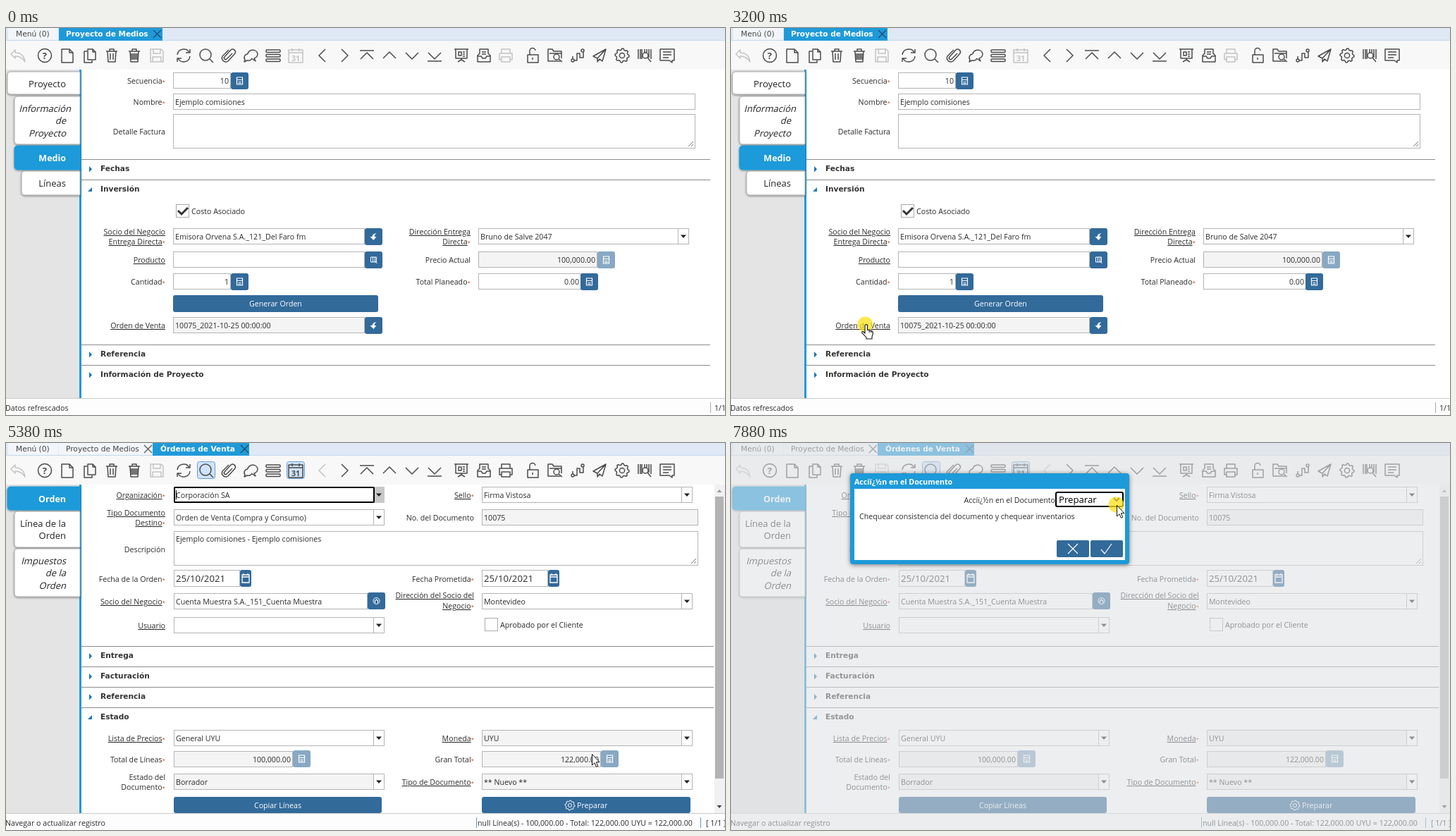
Animation of 1020x549 px, one loop 8000 ms. Source, as an HTML page:

```html
<!DOCTYPE html>
<html lang="es">
<head>
<meta charset="utf-8">
<title>Órdenes de Venta</title>
<style>
html, body { margin: 0; width: 100%; height: 100%; overflow: hidden; background: #fff; }
svg { display: block; width: 100vw; height: 100vh; }
text { font: 10.65px "Open Sans", "Noto Sans", sans-serif; fill: #2b2b2b; white-space: pre; }
.end { text-anchor: end; }
.mid { text-anchor: middle; }
.white { fill: #fff; }
.link { text-decoration: underline; }
.star { font-size: 8px; fill: #c8501e; }
.head { font: bold 10.6px "DejaVu Sans", Verdana, sans-serif; fill: #333; }
.tab { font: 10.65px "DejaVu Sans", Verdana, sans-serif; fill: #444; }
.tab.active { font-weight: bold; font-size: 10.5px; fill: #fff; }
.side { font-size: 13px; fill: #222; text-anchor: end; }
.side.active { font-weight: bold; font-size: 12.5px; fill: #fff; }
.date { font-size: 13.2px; }
.select { font-size: 13.2px; fill: #000; }
.title { font-weight: bold; fill: #fff; }
.ico { fill: none; stroke: #4b4b4b; stroke-width: 1.5; stroke-linejoin: round; }
.ico text { fill: #4b4b4b; stroke: none; font-weight: bold; }
.ico.off { opacity: .3; }

.anim { animation: 8s step-end infinite; }
#medios { animation-name: medios; }
#orden { animation-name: orden; }
#focus { animation-name: focus; }
#caret { animation-name: caret; }
#hover { animation-name: hover; }
#dialog { animation-name: dialog; }
#pick { animation-name: pick; }
#ring { animation-name: ring; }
#hand { animation-name: hand; }
#arrow { animation-name: arrow; }
#cursor { animation: move 8s infinite; }
@keyframes medios { 0% { opacity: 1 } 51.125%, 100% { opacity: 0 } }
@keyframes orden { 0% { opacity: 0 } 51.125%, 100% { opacity: 1 } }
@keyframes focus { 0% { opacity: 0 } 52% { opacity: 1 } 78.25%, 100% { opacity: 0 } }
@keyframes caret { 0%, 65.625% { opacity: 1 } 58.875%, 72.25%, 100% { opacity: 0 } }
@keyframes hover { 0% { opacity: 0 } 70.5% { opacity: 1 } 84.875%, 100% { opacity: 0 } }
@keyframes dialog { 0% { opacity: 0 } 83.25%, 100% { opacity: 1 } }
@keyframes pick { 0% { opacity: 0 } 84.875%, 100% { opacity: 1 } }
@keyframes ring {
  0%, 42.125%, 79.875% { opacity: 0 }
  39.125%, 77.375%, 98.5%, 100% { opacity: .75 }
}
@keyframes hand { 0% { opacity: 0 } 30.5% { opacity: 1 } 58.875%, 100% { opacity: 0 } }
@keyframes arrow { 0% { opacity: 1 } 30.5% { opacity: 0 } 58.875%, 100% { opacity: 1 } }
@keyframes move {
  0% { transform: translate(1030px, 560px); animation-timing-function: step-end }
  7.5% { transform: translate(985px, 530px); animation-timing-function: steps(3) }
  10.125% { transform: translate(430px, 254px); animation-timing-function: step-end }
  11% { transform: translate(359px, 267px); animation-timing-function: step-end }
  18.375% { transform: translate(359px, 267px); animation-timing-function: steps(7) }
  24.5% { transform: translate(139px, 425px); animation-timing-function: steps(2) }
  26.125% { transform: translate(167px, 431px); animation-timing-function: steps(3) }
  28.75% { transform: translate(208px, 433px); animation-timing-function: steps(4) }
  32.25% { transform: translate(191px, 421px); animation-timing-function: step-end }
  58% { transform: translate(191px, 421px); animation-timing-function: steps(5) }
  62.25% { transform: translate(820px, 468px); animation-timing-function: step-end }
  64.75% { transform: translate(820px, 468px); animation-timing-function: steps(3) }
  67.25% { transform: translate(831px, 441px); animation-timing-function: steps(4) }
  70.5% { transform: translate(829px, 510px); animation-timing-function: steps(3) }
  73% { transform: translate(827px, 506px); animation-timing-function: step-end }
  86.5% { transform: translate(827px, 506px); animation-timing-function: steps(5) }
  90.875% { transform: translate(650px, 260px); animation-timing-function: steps(5) }
  95.25%, 100% { transform: translate(547px, 88px) }
}
</style>
</head>
<body>
<svg id="stage" viewBox="0 0 1020 549" preserveAspectRatio="none"></svg>
<script>
const BLUE = '#1f9ad9', BTN = '#326a9a', LINE = '#b4b4b4', OFF = '#f4f4f4';

const text = (x, y, s, cls = '') => `<text x="${x}" y="${y}" class="${cls}">${s}</text>`;
const fill = (x, y, w, h, color, r = 0) =>
  `<rect x="${x}" y="${y}" width="${w}" height="${h}" rx="${r}" fill="${color}"/>`;
const box = (x, y, w, h, color = '#fff', stroke = LINE, r = 0) =>
  `<rect x="${x + .5}" y="${y + .5}" width="${w - 1}" height="${h - 1}" rx="${r}" fill="${color}" stroke="${stroke}"/>`;
const path = (d, stroke, w = 1, color = 'none') =>
  `<path d="${d}" stroke="${stroke}" stroke-width="${w}" fill="${color}"/>`;
const at = (x, y, s, attr = '') => `<g transform="translate(${x} ${y})" ${attr}>${s}</g>`;

// "_" marks a linked label, a closing "*" a required one
const label = (x, y, s) => {
  const star = s.endsWith('*'), link = s[0] === '_';
  const word = s.replace(/^_|\*$/g, '');
  return text(x, y, `<tspan class="${link ? 'link' : ''}">${word}</tspan>` +
    (star ? '<tspan class="star">*</tspan>' : ''), 'end');
};
const field = (x, y, w, s = '', color) => box(x, y, w, 23, color) + text(x + 3, y + 16, s);
const number = (x, y, w, s, color) => box(x, y, w, 23, color) + text(x + w - 3, y + 16, s, 'end');
const down = (x, y) => `<path d="M${x - 4} ${y - 2}h8l-4 4.500z" fill="#222"/>`;
const combo = (x, y, s = '', color = '#fff') => field(x, y, 299, s, color) +
  box(x + 283, y, 16, 23) + down(x + 291, y + 11.5);
const area = (x, y, w, s = '') => box(x, y, w, 49) + text(x + 3, y + 15, s) +
  path(`M${x + w - 10} ${y + 46}l7-7m-3 7l3-3`, '#777');

const glyphs = {
  calc: path('M-4-5H4V5H-4ZM-4-1.500H4M-2 1.500H2M-2 3.500H2', '#fff', 1.2),
  zoom: '<path d="M4-5Q-2-4-2 0H-5L0 5L4 0H1Q1-3 4-5Z" fill="#fff"/>',
  item: path('M-4-4H4V3H-4ZM-1-4V3M2-4V3M1 1L5 5', '#fff', 1),
  user: '<circle r="4.500" fill="none" stroke="#fff"/>' + path('M-2 3V-1H2V3M0-3V-1', '#fff'),
  date: path('M-5-5H5V6H-5ZM-5-2H5M-3-7V-4M3-7V-4', '#fff', 1.3)
};
const mini = (x, y, kind, off, w = 25) => at(x, y,
  fill(0, 0, w, 24, BTN, 3) + at(w / 2, 12, glyphs[kind]), off ? 'opacity=".58"' : '');
const date = (x, y, s) => box(x, y, 94, 24) + text(x + 3, y + 17, s, 'date') +
  mini(x + 94, y, 'date', false, 16);
const button = (x, y, w, h, s, color = BTN) => fill(x, y, w, h, color, 3) +
  text(x + w / 2, y + 16, s, 'mid white');
const check = (x, y, on) => box(x, y, 19, 19, '#fff', '#aaa') +
  (on ? path(`M${x + 3} ${y + 9}l5 5l9-9`, '#333', 3) : '');

const rule = (y, end) => fill(107, y, end - 107, 1, '#8c8c8c');
const section = (y, s, end, open) => rule(y, end) + text(134, y + 16.5, s, 'head') +
  `<path d="${open ? `M122 ${y + 11}v6h-6z` : `M118 ${y + 10}l4 4.200l-4 4.200z`}" fill="#1878b4"/>`;

const gear = r => {
  let d = '';
  for (let i = 0; i < 32; i++) {
    const a = i * Math.PI / 16, k = i % 4 < 2 ? r : r * .8;
    d += `${i ? 'L' : 'M'}${(k * Math.cos(a)).toFixed(1)} ${(k * Math.sin(a)).toFixed(1)}`;
  }
  return `<path d="${d}Z"/><circle r="${r * .36}"/>`;
};
const p = d => `<path d="${d}"/>`;
const bin = p('M-8-6H8M-3-6V-9H3V-6M-6-6L-5 9H5L6-6M-2-3V6M2-3V6');
const icons = {
  undo: [17, p('M-10-2L-4-8V-4Q8-4 10 9Q5 1-4 1V4Z')],
  help: [55, '<circle r="9.500"/>' + text(0, 5, '?', 'mid select')],
  add: [87, p('M-8-9H3L8-4V10H-8ZM3-9V-4H8')],
  copy: [119, p('M-3-9H4L8-5V6H-3ZM4-9V-5H8M-4-6H-8V10H3V7')],
  del: [150, bin],
  delAll: [182, bin + p('M0-3V6M-4-3V6M4-3V6')],
  save: [214, p('M-9-9H6L9-6V9H-9ZM-5-9V-3H5V-9M-6 9V2H6V9')],
  sync: [252, p('M-9-1A9 9 0 0 1 8-4M9-9V-4H3M9 1A9 9 0 0 1-8 4M-9 9V4H-3')],
  find: [284, '<circle cx="-1" cy="-1" r="8"/>' + p('M5 5L10 10')],
  clip: [316, p('M5-3L-3 5A2 2 0 0 1-6 2L3-8A4 4 0 0 1 9-3L-1 8A5.500 5.500 0 0 1-9 1L0-8')],
  chat: [347, p('M-4-2A7 6 0 1 1 5 4L7 8L1 4M-4-2A5 5 0 0 0-8 6L-9 9L-5 7A6 5 0 0 0 2 4')],
  rows: [379, [-8, -1.5, 5].map(y => `<rect x="-10" y="${y}" width="20" height="3.500" rx="1"/>`).join('')],
  cal: [411, p('M-10-8H10V10H-10ZM-10-4H10M-5-10V-6M5-10V-6') + text(0, 7.5, '31', 'mid')],
  prev: [449, p('M4-9L-5 0L4 9')],
  next: [480, p('M-4-9L5 0L-4 9')],
  top: [512, p('M-10-7H10M-9 5L0-4L9 5')],
  up: [544, p('M-9 4L0-5L9 4')],
  down: [576, p('M-9-4L0 5L9-4')],
  bottom: [608, p('M-10 8H10M-9-4L0 5L9-4')],
  board: [646, p('M-10-9H10M-8-9V4H8V-9M0 4V7M-5 9L0 6L5 9M-4-5H0V0H-4ZM2-5H5M2-2H5M2 1H5')],
  tray: [678, p('M-9 0L-6-3V-9H6V-3L9 0V9H-9ZM-9 1H-4L-2 4H2L4 1H9M-3-5H3M-3-2H3')],
  print: [709, p('M-6-3V-9H6V-3M-6 6H-9V-3H9V6H6M-6 2H6V9H-6Z')],
  lock: [747, p('M-7-1H8V10H-7ZM-4-1V-6A4 4 0 0 1 4-7M0 3V6')],
  folder: [779, p('M8 8H-10V-9H-4L-2-6H9V4M-8-3H9') + '<circle cx="2" cy="2" r="4"/>' + p('M5 5L10 9')],
  flow: [811, '<circle cx="-7" cy="7" r="2"/><circle cx="7" cy="-7" r="2"/>' + p('M-5 7H-1V-3H3V3H8V-5M-7 5V1')],
  send: [842, p('M9-9L-9 1L-3 4L9-9L4 8L0 5L-3 9V4')],
  gear: [874, gear(10)],
  scan: [906, p('M-9-9V5M-6-9V5M-4-9V5M0-9V-4M3-9V-4M6-9V3M9-9V5') + '<circle cx="1" cy="0" r="4"/>' + p('M4 3L9 9')],
  doc: [938, p('M-10-9H10V7H7V10L3 7H-10ZM-6-5H6M-6-1H6M-6 3H2')]
};
const toolbar = (off, on) => fill(0, 18, 1020, 41, '#f8f8f8') + Object.entries(icons).map(([k, [x, s]]) =>
  (on.includes(k) ? box(x - 13, 26, 26, 25, '#cfe3fa', '#6d9fd4', 3) : '') +
  at(x, 39, s, `class="ico ${off.includes(k) ? 'off' : ''}"`)).join('');

const close = (x, c = '#555') => path(`M${x - 5} 3l11 11m0-11l-11 11`, c, 1.2);
const strip = fill(0, 0, 1020, 18, '#dfe9f6') + fill(3, 0, 71, 17, '#f2f5f9') +
  fill(0, 17, 1020, 1, '#c4d8ee') + `<g>${text(14, 11.5, 'Menú (0)', 'tab')}</g>`;
const frame = fill(0, 59, 104, 467, '#e4e4e4') + fill(104, 59, 3, 467, BLUE) +
  fill(0, 525, 1020, 24, '#fdfdfd') + fill(0, 525, 1020, 1, '#c9c9c9');
const sideTab = (x, y, h, lines, active, slant) =>
  `<path d="M105 ${y}H${x + 5}q-5 0-5 5V${y + h - 5}q0 5 5 5H105z" fill="${active ? BLUE : '#fff'}" stroke="${active ? BLUE : '#a8a8a8'}" filter="url(#soft)"/>` +
  lines.map((s, i) => {
    const line = text(0, 0, s, active ? 'side active' : 'side');
    const end = s === 'Información' ? 92 : 85;
    return at(end, y + 21.5 + i * 17.5, slant ? `<g transform="skewX(-14)">${line}</g>` : line);
  }).join('');

const medios = () => strip + fill(75, 0, 147, 18, BLUE) +
  text(85, 11.5, 'Proyecto de Medios', 'tab active') + close(214, '#24486a') +
  toolbar(['undo', 'save', 'cal', 'print'], []) + frame +
  sideTab(2, 62, 32, ['Proyecto']) +
  sideTab(12, 97, 68, ['Información', 'de', 'Proyecto'], false, true) +
  sideTab(12, 167, 34, ['Medio'], true) + sideTab(22, 203, 34, ['Líneas']) +
  label(226, 79, 'Secuencia*') + number(237, 63, 82, '10') + mini(319, 63, 'calc') +
  label(226, 109, 'Nombre*') + field(237, 93, 741, 'Ejemplo comisiones') +
  label(226, 151, 'Detalle Factura') + area(237, 122, 741) +
  section(186, 'Fechas', 999) + section(215, 'Inversión', 999, true) +
  check(241, 250, true) + text(263, 264, 'Costo Asociado') +
  label(226, 293, '_Socio del Negocio') + label(226, 307, '_Entrega Directa*') +
  field(237, 284, 272, 'Emisora Orvena S.A._121_Del Faro fm') + mini(509, 284, 'zoom') +
  label(659, 293, '_Dirección Entrega') + label(659, 307, '_Directa*') +
  combo(670, 284, 'Bruno de Salve 2047') +
  label(226, 333, '_Producto') + field(237, 317, 272) + mini(509, 317, 'item') +
  label(659, 333, 'Precio Actual') + number(670, 317, 169, '100,000.00', OFF) + mini(839, 317, 'calc', true) +
  label(226, 364, 'Cantidad*') + number(237, 348, 82, '1') + mini(319, 348, 'calc') +
  label(659, 364, 'Total Planeado*') + number(670, 348, 146, '0.00') + mini(815, 348, 'calc') +
  button(237, 379, 291, 24, 'Generar Orden') +
  label(226, 426, '_Orden de Venta') + field(237, 410, 272, '10075_2021-10-25 00:00:00', OFF) +
  mini(509, 410, 'zoom') +
  section(449, 'Referencia', 999) + section(478, 'Información de Proyecto', 999) +
  text(-1, 543, 'Datos refrescados') + fill(999, 531, 1, 15, '#9ab') + text(1005, 543, '1/1');

const prepare = color => button(675, 502, 296, 23, '', color) +
  at(800, 514, `<g fill="none" stroke="#fff">${gear(7)}</g>`) + text(810, 517.5, 'Preparar', 'white');

const orden = () => strip + fill(75, 0, 133, 17, '#f2f5f9') + text(85, 11.5, 'Proyecto de Medios', 'tab') +
  close(201) + fill(208, 0, 137, 18, BLUE) + text(219, 11.5, 'Órdenes de Venta', 'tab active') +
  close(338, '#24486a') +
  toolbar(['undo', 'save', 'prev'], ['find', 'cal']) +
  label(226, 78, '_Organización*') + combo(238, 62, 'Corporación SA') +
  label(664, 78, '_Sello*') + combo(675, 62, 'Firma Vistosa') +
  label(226, 103, '_Tipo Documento') + label(226, 117, '_Destino*') +
  combo(238, 94, 'Orden de Venta (Compra y Consumo)') +
  label(664, 110, 'No. del Documento') + field(675, 94, 307, '10075', OFF) +
  label(226, 155, 'Descripción') + area(238, 125, 744, 'Ejemplo comisiones - Ejemplo comisiones') +
  label(226, 197, 'Fecha de la Orden*') + date(238, 180, '25/10/2021') +
  label(664, 197, 'Fecha Prometida*') + date(675, 180, '25/10/2021') +
  label(226, 229, '_Socio del Negocio*') +
  field(238, 213, 275, 'Cuenta Muestra S.A._151_Cuenta Muestra') + mini(513, 212, 'user') +
  label(664, 220, '_Dirección del Socio del') + label(664, 235, '_Negocio*') + combo(675, 213, 'Montevideo') +
  label(226, 263, '_Usuario') + combo(238, 247) +
  check(679, 248) + text(701, 262, 'Aprobado por el Cliente') +
  section(288, 'Entrega', 1004) + section(317, 'Facturación', 1004) +
  section(346, 'Referencia', 1004) + section(375, 'Estado', 1004, true) +
  label(226, 423, '_Lista de Precios*') + combo(238, 407, 'General UYU') +
  label(664, 423, '_Moneda*') + combo(675, 407, 'UYU', OFF) +
  label(226, 453, 'Total de Líneas*') + number(238, 437, 169, '100,000.00', OFF) + mini(407, 436, 'calc', true) +
  label(664, 453, 'Gran Total*') + number(675, 437, 169, '122,000.00', OFF) + mini(844, 436, 'calc', true) +
  label(226, 478, 'Estado del') + label(226, 492, 'Documento*') + combo(238, 469, 'Borrador', OFF) +
  label(664, 485, '_Tipo de Documento*') + combo(675, 469, '** Nuevo **', OFF) +
  button(238, 502, 295, 23, 'Copiar Líneas') + prepare(BTN) +
  `<g id="hover" class="anim">${prepare('#0b3657')}</g>` +
  `<g id="focus" class="anim">${fill(521, 62, 16, 23, '#c8c8c8')}${down(529, 73.5)}
    <rect x="239" y="63" width="283" height="21" rx="1" fill="none" stroke="#000" stroke-width="2"/>
    <rect id="caret" class="anim" x="241" y="67" width="1" height="13"/></g>` +
  fill(1005, 59, 15, 466, '#f1f1f1') + fill(1006, 76, 12, 400, '#b3b3b3') +
  '<path d="M1008.500 70h7l-3.500-4z" fill="#999"/><path d="M1008.500 514h7l-3.500 4z" fill="#444"/>' +
  frame +
  sideTab(2, 62, 33, ['Orden'], true) + sideTab(12, 97, 51, ['Línea de la', 'Orden']) +
  sideTab(12, 150, 68, ['Impuestos', 'de la', 'Orden'], false, true) +
  text(-1, 543, 'Navegar o actualizar registro') + fill(667, 531, 1, 15, '#69b') +
  text(669, 543, 'null Línea(s) - 100,000.00 - Total: 122,000.00 UYU = 122,000.00') +
  fill(985, 531, 1, 15, '#69b') + text(993, 543, '[ 1/1 ]');

const action = 'Acciï¿½n en el Documento';
const dialog = () => '<rect width="1020" height="549" fill="#e0e1e3" opacity=".57"/>' +
  `<rect x="169" y="43" width="396" height="129" rx="4" fill="${BLUE}" filter="url(#deep)"/>` +
  fill(175, 65, 384, 101, '#fff') + text(175, 58.5, action, 'title') +
  text(460, 84.5, action, 'end') + box(460, 70, 97, 21, '#fff', '#767676', 2) +
  '<rect id="pick" class="anim" x="461" y="70" width="95" height="20" rx="2" fill="none" stroke="#000" stroke-width="2"/>' +
  text(465, 85, 'Preparar', 'select') + path('M543 78l4 4l4-4', '#111', 2) +
  text(182, 108, 'Chequear consistencia del documento y chequear inventarios') +
  fill(462, 138, 46, 24, BTN, 2) + path('M478 143l14 14m0-14l-14 14', '#fff', 1.2) +
  fill(510, 138, 46, 24, BTN, 2) + path('M525 151l5 6l10-14', '#fff', 1.2);

const shadow = (id, blur, a) => `<filter id="${id}" x="-20%" y="-20%" width="140%" height="150%">
  <feDropShadow dx="0" dy="1" stdDeviation="${blur}" flood-opacity="${a}"/></filter>`;

document.getElementById('stage').innerHTML =
  `<defs>${shadow('soft', 1.5, .45)}${shadow('deep', 3, .5)}</defs>
  <rect width="1020" height="549" fill="#fff"/>
  <g id="medios" class="anim">${medios()}</g>
  <g id="orden" class="anim">${orden()}</g>
  <g id="dialog" class="anim">${dialog()}</g>
  <g id="cursor">
    <circle id="ring" class="anim" cx="-.5" cy="-.5" r="11" fill="#fbe11a"/>
    <g id="arrow" class="anim">${path('M.5 .5V16L4 12.700L6.400 18.300L8.700 17.300L6.400 11.700H11Z', '#111', 1, '#fff')}</g>
    <g id="hand" class="anim">${path('M0 0Q2-1 2.500 1V7L8 8.500Q10.500 9 10.500 12L9 17V20H1V18L-5.500 11Q-5 8.500-3 10L-1 12V1Q-1 0 0 0ZM5.200 8V11M7.800 8.500V11', '#111', 1.1, '#fff')}</g>
  </g>`;
</script>
</body>
</html>
```
